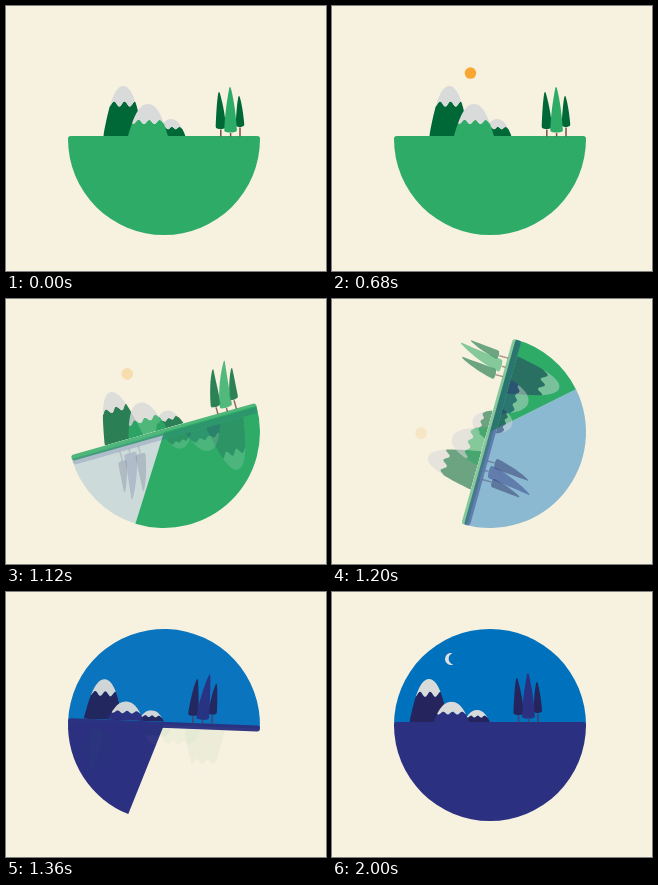
These frames come from a looping animation (320x265 px, 2240 ms). An HTML page:

```html
<!DOCTYPE html>
<html lang="en">
<head>
<meta charset="utf-8">
<title>Day and night</title>
<style>
  html, body { margin: 0; width: 100%; height: 100%; overflow: hidden; background: #f7f1e0; }
  svg { display: block; width: 100vw; height: 100vh; }
</style>
</head>
<body>
<svg id="stage" viewBox="0 0 320 265"></svg>
<script>
const LOOP = 2240, STEP = 40, CX = 158, CY = 133, R = 96, GROUND = 130;
const DAY = { dark: '#006837', light: '#2eac67', trunk: '#75513f' };
const NIGHT = { dark: '#25245c', light: '#2b3080', trunk: '#4a3f66' };
const SKY = '#0071bd', SNOW = '#d9dada', SUN = '#f8a832', MOON = '#dfe1e1';

const linear = k => k;
const easeOut = k => 1 - (1 - k) ** 2;
const easeInOut = k => k < .5 ? 2 * k * k : 1 - 2 * (1 - k) ** 2;
const ramp = (t, from, to, ease = linear) => ease(Math.min(1, Math.max(0, (t - from) / (to - from))));

const stage = document.getElementById('stage');

function set(el, attrs) {
  for (const k in attrs) el.setAttribute(k, attrs[k]);
}

function add(parent, tag, attrs = {}) {
  const el = document.createElementNS('http://www.w3.org/2000/svg', tag);
  set(el, attrs);
  parent.append(el);
  return el;
}

// Point at an angle measured clockwise from straight up
function polar(deg, r) {
  const a = deg * Math.PI / 180;
  return [CX + r * Math.sin(a), CY - r * Math.cos(a)];
}

// Pie slice, angles counterclockwise from the right
function slice(from, to) {
  if (to - from < .01) return '';
  const p = polar(90 - from, R), q = polar(90 - to, R);
  return `M${CX} ${CY}L${p}A${R} ${R} 0 ${to - from > 180 ? 1 : 0} 0 ${q}Z`;
}

// Dome split by a wavy snow line; rock and snow never overlap
let peaks = 0;
function mountain(parent, x, half, height, snow, wave, color) {
  const X = u => x + u * half, Y = v => GROUND - v * height;
  const id = 'peak' + peaks++;
  add(add(parent, 'clipPath', { id }), 'path', {
    d: `M${X(-1)} ${GROUND}C${X(-.8)} ${Y(.4)} ${X(-.55)} ${Y(1)} ${x} ${Y(1)}` +
      `S${X(.8)} ${Y(.4)} ${X(1)} ${GROUND}Z`
  });
  let line = '';
  for (let u = -1; u <= 1.01; u += .05) {
    line += `${line ? 'L' : 'M'}${X(u)} ${GROUND - snow + wave * Math.cos(12 * (u + .2))}`;
  }
  const part = (edge, fill) =>
    add(parent, 'path', { d: `${line}V${edge}H${X(-1)}Z`, fill, 'clip-path': `url(#${id})` });
  part(GROUND, color);
  part(Y(1.1), SNOW);
}

const TREES = [
  { tip: 213, top: 86, mid: 214.8, base: 122.5, tone: 'dark' },
  { tip: 233, top: 90, mid: 234, base: 120.5, tone: 'dark' },
  { tip: 224, top: 81, mid: 224.6, base: 126, tone: 'light' }
];

function leaf({ tip, top, mid, base }, lean) {
  const p = (x, y) => `${x + lean * ((GROUND - y) / 49) ** 2} ${y} `;
  const tall = base - top, half = tall * .14, l = mid - half, r = mid + half;
  const shoulder = top + 8, waist = top + tall * .55;
  return `M${p(tip - .7, top + 1)}Q${p(tip, top - 1)}${p(tip + .8, top + 1)}` +
    `C${p(tip + 2.8, shoulder)}${p(r - 1, waist)}${p(r, base - 2)}` +
    `Q${p(r, base)}${p(r - 2, base)}Q${p(mid, base + 1.2)}${p(l + 1.5, base)}` +
    `Q${p(l, base)}${p(l, base - 2)}C${p(l + .6, waist)}${p(tip - 2, shoulder)}${p(tip - .7, top + 1)}Z`;
}

function forest(parent, shift, colors) {
  const g = add(parent, 'g', { transform: `translate(${shift} 0)` });
  return TREES.map(({ mid, base, tone }) => {
    add(g, 'path', { d: `M${mid} ${base + 1}V${GROUND + .5}`, stroke: colors.trunk, 'stroke-width': 1.5 });
    return add(g, 'path', { fill: colors[tone] });
  });
}

function scene(colors, shift, hills) {
  const g = add(stage, 'g');
  add(g, 'rect', { x: CX - R, y: GROUND, width: 2 * R, height: 6, rx: 2.8, fill: colors.light });
  const range = add(g, 'g');
  for (const { x, half, h, snow, wave, tone } of hills) {
    mountain(range, x, half, h, snow, wave, colors[tone]);
  }
  return { g, range, trees: forest(g, shift, colors) };
}

const discs = add(stage, 'g');
const bowl = add(discs, 'path', { fill: DAY.light });
const sky = add(discs, 'path', { fill: SKY });
const earth = add(discs, 'path', { fill: NIGHT.light });
const moon = add(stage, 'path', { d: 'M1.6 -5.8A6 6 0 1 0 2.3 5.5A5.9 5.9 0 0 1 1.6 -5.8Z', fill: MOON });

const day = scene(DAY, 0, [
  { x: 165, half: 14.5, h: 17, snow: 8, wave: 1.2, tone: 'dark' },
  { x: 117.3, half: 20, h: 50, snow: 32, wave: 2.6, tone: 'dark' },
  { x: 142, half: 20, h: 32, snow: 14, wave: 2.1, tone: 'light' }
]);
const night = scene(NIGHT, -28.2, [
  { x: 145, half: 13, h: 12, snow: 5.5, wave: 1, tone: 'dark' },
  { x: 97, half: 19.5, h: 43.5, snow: 28, wave: 2.6, tone: 'dark' },
  { x: 119.5, half: 18, h: 20.5, snow: 9, wave: 1.4, tone: 'light' }
]);
const sun = add(stage, 'circle', { r: 5.8, fill: SUN });

const turn = deg => `rotate(${deg} ${CX} ${CY})`;
const fadeTo = (el, k) => set(el, { 'fill-opacity': k, 'stroke-opacity': k });

function draw(t) {
  // A small wind-up, then half a turn back
  const rot = 3.7 * ramp(t, 680, 960, easeOut) - 183.7 * ramp(t, 1040, 1387, easeInOut);
  const sweep = 360 * ramp(t, 1066, 1722, easeOut);
  const fade = ramp(t, 1066, 1372);
  const lean = 12 * (ramp(t, 700, 1200, easeInOut) - ramp(t, 1200, 1520, easeInOut));

  set(discs, { transform: turn(rot + 180) });
  set(bowl, { d: slice(Math.min(sweep, 180), 180) });
  set(sky, { d: slice(0, Math.min(sweep, 180)), opacity: fade });
  set(earth, { d: slice(180, Math.max(sweep, 180)) });

  set(day.g, { transform: turn(rot) });
  fadeTo(day.g, 1 - fade);
  set(night.g, { transform: `${turn(rot + 180)} translate(0 ${-5 * (1 - fade)})` });
  fadeTo(night.g, fade);

  // Night hills bounce as they land
  const since = Math.max(0, t - 1200);
  const stretch = 1 + .13 * Math.cos(Math.PI * since / 160) * Math.exp(-since / 300);
  set(night.range, { transform: `translate(0 ${GROUND}) scale(1 ${stretch}) translate(0 ${-GROUND})` });

  TREES.forEach((tree, i) => {
    const d = leaf(tree, lean);
    set(day.trees[i], { d });
    set(night.trees[i], { d });
  });

  const rise = ramp(t, 60, 640, easeOut);
  const [sx, sy] = polar(-90 + 73.5 * rise + rot, 82 - 13.2 * rise);
  set(sun, { cx: sx, cy: sy, opacity: ramp(t, 40, 240) - ramp(t, 700, 1290) });

  const angle = 85 - 115.6 * ramp(t, 1587, 2000, easeOut);
  const [mx, my] = polar(angle, 78 + angle * .042);
  set(moon, { transform: `translate(${mx} ${my})`, opacity: ramp(t, 1560, 1860) });
}

const start = performance.now();
function tick() {
  const t = (performance.now() - start) % LOOP;
  draw(Math.floor(t / STEP) * STEP);
  requestAnimationFrame(tick);
}
tick();
</script>
</body>
</html>
```
